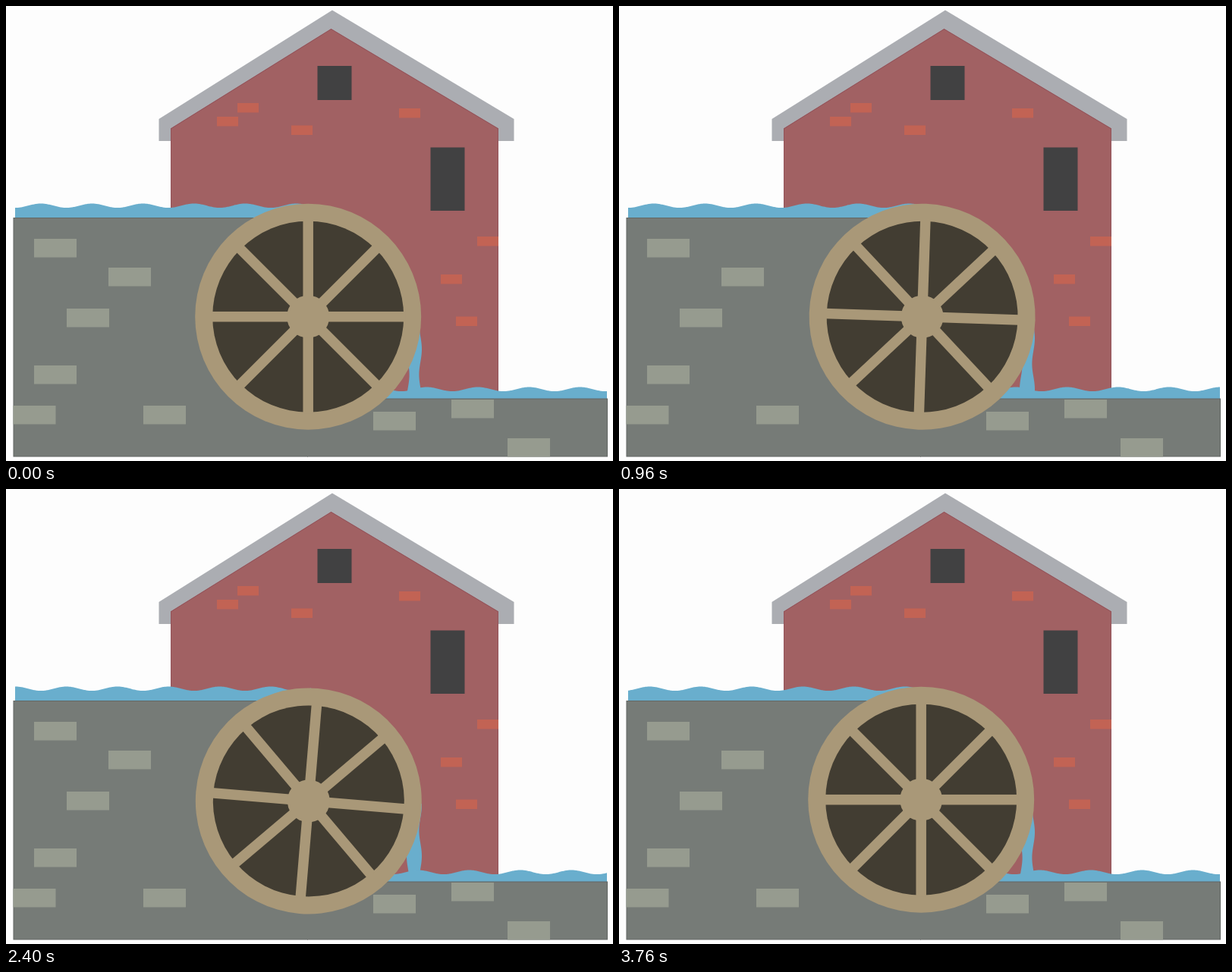
An HTML page with a canvas for the animation above (3.84 s loop, 800 px wide and 600 px high).

```html
<!DOCTYPE html>
<html lang="en">
<head>
<meta charset="utf-8">
<title>Water mill</title>
<style>
  html, body { margin: 0; width: 100%; height: 100%; overflow: hidden; background: #fdfdfd; }
  canvas { display: block; }
</style>
</head>
<body>
<canvas id="stage" width="800" height="600"></canvas>
<script>
const ctx = document.getElementById('stage').getContext('2d');
const TAU = Math.PI * 2;
const STEP_MS = 80, STEPS = 48;
const WAVELENGTH = 67.3;
const WATER = '#69aecd', WOOD = '#a99878';

function rect(x, y, w, h, fill) {
  ctx.fillStyle = fill;
  ctx.fillRect(x, y, w, h);
}

function disc(radius, fill) {
  ctx.beginPath();
  ctx.arc(0, 0, radius, 0, TAU);
  ctx.fillStyle = fill;
  ctx.fill();
}

// A wall with a pointed top; leaves its outline as the current path.
function gable(left, right, apexX, apexY, eave, base, fill) {
  ctx.beginPath();
  ctx.moveTo(left, base);
  ctx.lineTo(left, eave);
  ctx.lineTo(apexX, apexY);
  ctx.lineTo(right, eave);
  ctx.lineTo(right, base);
  ctx.closePath();
  ctx.fillStyle = fill;
  ctx.fill();
}

// Height of a travelling wave; crest is a crest position at phase 0.
const wave = (pos, crest, phase) => Math.cos(TAU * ((pos - crest) / WAVELENGTH - phase));

function drawHouse() {
  gable(201.5, 669.5, 430, 5.5, 149, 178, '#abadb2');
  ctx.save();
  gable(217, 649, 428.5, 30, 161.5, 515, '#a16163');
  ctx.clip();
  ctx.strokeStyle = '#93535a';
  ctx.lineWidth = 2;
  ctx.stroke();
  const bricks = [[305, 128], [278, 146], [376, 157.5], [518, 135], [621, 304], [573, 354], [593, 409.5]];
  for (const [x, y] of bricks) rect(x, y, 28, 12.5, '#c26354');
  ctx.restore();
  rect(410.5, 79, 45, 45, '#414142');
  rect(559.5, 186.5, 45, 83.5, '#414142');
}

function drawPool(left, right, level, bottom, crest, phase) {
  ctx.beginPath();
  ctx.moveTo(right, bottom);
  ctx.lineTo(left, bottom);
  for (let x = left; x <= right; x++) ctx.lineTo(x, level - 2.8 * wave(x, crest, phase));
  ctx.fillStyle = WATER;
  ctx.fill();
}

function drawFall(phase) {
  for (let y = 415; y < 512; y++) {
    const halfWidth = 8.2 + 1.8 * wave(y, 452, phase);
    rect(538 - halfWidth, y, 2 * halfWidth, 1, WATER);
  }
}

function drawStonework() {
  for (const [inset, fill] of [[0, '#636764'], [1, '#767b77']]) {
    rect(9.5 + inset, 279 + inset, 388.5, 315.5 - 2 * inset, fill);
    rect(397, 517.5 + inset, 396 - inset, 77 - 2 * inset, fill);
  }
  const stones = [[37, 307], [135, 345], [80, 399], [37, 474], [9.5, 527], [181, 527], [484, 535], [587, 519], [661, 570]];
  for (const [x, y] of stones) rect(x, y, 56, 24.5, '#969b8f');
}

function drawWheel(angle) {
  ctx.save();
  // The hub sits slightly off the pivot, so the wheel wobbles.
  const lean = angle + TAU * 5 / 8;
  ctx.translate(398.9 + Math.cos(lean), 410.4 + Math.sin(lean));
  ctx.rotate(angle);
  disc(149, WOOD);
  disc(126, '#423d32');
  for (let i = 0; i < 4; i++) {
    rect(-128, -6.75, 256, 13.5, WOOD);
    ctx.rotate(TAU / 8);
  }
  disc(28, WOOD);
  ctx.restore();
}

function draw(step) {
  const turn = step / (STEPS - 1);
  rect(0, 0, 800, 600, '#fdfdfd');
  drawHouse();
  drawFall(turn * 7);
  drawPool(12, 402, 263.3, 280, 46, step / STEPS * 4);
  drawPool(495, 792, 505.3, 518, 622, turn * 6);
  drawStonework();
  drawWheel(TAU * turn);
}

const start = performance.now();
function tick() {
  draw(Math.floor((performance.now() - start) / STEP_MS) % STEPS);
  requestAnimationFrame(tick);
}
tick();
</script>
</body>
</html>
```
